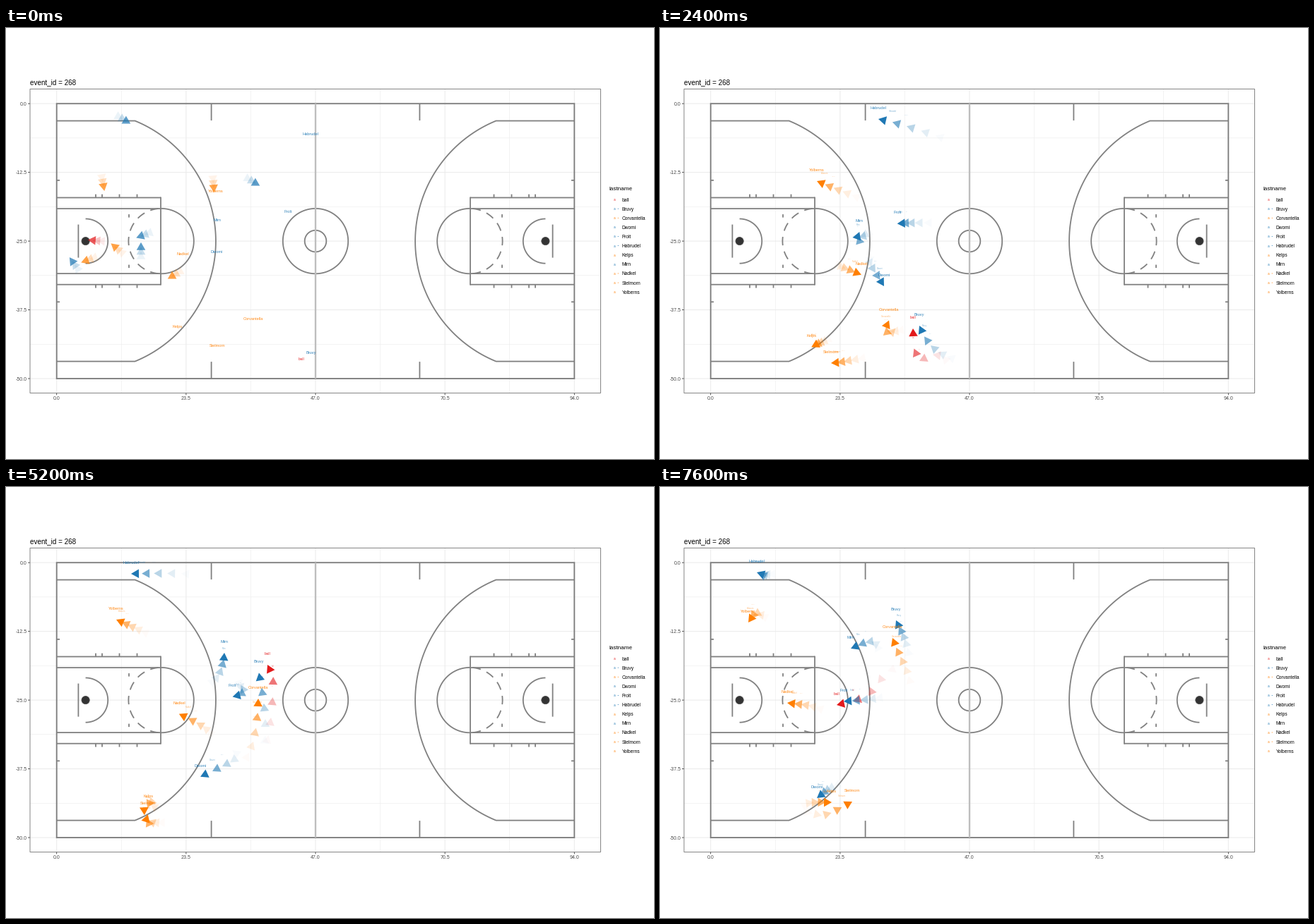
A matplotlib script that plays this animation: 917x611 px, repeating every 8000 ms.

```python
import numpy as np
import matplotlib.pyplot as plt
from matplotlib.animation import FuncAnimation
from matplotlib.patches import Circle, Polygon, Rectangle

W, H, DPI = 917, 611, 100
FRAMES, INTERVAL = 20, 400
PX = 72 / DPI
BLUE, ORANGE, RED = "#1F78B4", "#FF7F00", "#E31A1C"
COURT, GRID = "#808080", "#EBEBEB"
LEFT, RIGHT, TOP, BOTTOM = 71.7, 804.3, 107.2, 497
PANEL = (34, 86.5, 841.5, 517.5)
MID_X, MID_Y = (LEFT + RIGHT) / 2, (TOP + BOTTOM) / 2
TRAIL = 4

plt.rcParams.update({"font.family": "Liberation Sans", "path.snap": False})
fig = plt.figure(figsize=(W / DPI, H / DPI), dpi=DPI, facecolor="white")
ax = fig.add_axes([0, 0, 1, 1])
ax.set_xlim(0, W)
ax.set_ylim(H, 0)
ax.axis("off")


def smooth_path(keys):
    """Cubic Hermite curve through {frame: (x, y)}, sampled once per frame."""
    t = np.array(list(keys), float)
    p = np.array(list(keys.values()), float)
    slope = np.gradient(p, t, axis=0)
    f = np.arange(FRAMES)
    i = np.clip(np.searchsorted(t, f, side="right") - 1, 0, len(t) - 2)
    h = (t[i + 1] - t[i])[:, None]
    u = (f - t[i])[:, None] / h
    return ((1 + 2 * u) * (1 - u) ** 2 * p[i] + u * (1 - u) ** 2 * h * slope[i]
            + u * u * (3 - 2 * u) * p[i + 1] + u * u * (u - 1) * h * slope[i + 1])


class Player:
    def __init__(self, name, color, before, keys):
        self.name, self.color = name, color
        self.before = before  # x, y and heading at the end of the previous play
        self.path = smooth_path(keys)
        step = np.diff(self.path, axis=0, prepend=self.path[:1])
        self.heading = step / np.maximum(np.hypot(*step.T), 1e-6)[:, None]


PLAYERS = [
    Player("ball", RED, (123, 301, 175),
           {0: (418, 485), 3: (386, 463), 4: (367, 472), 6: (358, 426), 10: (375, 327),
            13: (370, 252), 15: (322, 261), 17: (295, 296), 19: (250, 309)}),
    Player("Bruvy", BLUE, (353, 220, -30),
           {0: (432, 476), 4: (383, 450), 6: (367, 422), 10: (367, 329),
            15: (350, 228), 19: (334, 189)}),
    Player("Corvantella", ORANGE, (294, 226, 275),
           {0: (350, 428), 5: (320, 424), 7: (330, 403), 10: (350, 361),
            13: (357, 300), 19: (329, 214)}),
    Player("Dwomi", BLUE, (191, 295, 200),
           {0: (298, 333), 3: (300, 339), 6: (317, 366), 9: (325, 385),
            11: (306, 396), 15: (245, 425), 19: (222, 441)}),
    Player("Frolt", BLUE, (191, 311, 90),
           {0: (399, 276), 5: (341, 277), 8: (331, 280), 10: (334, 290),
            15: (304, 300), 19: (260, 304)}),
    Player("Habrudel", BLUE, (170, 132, -30),
           {0: (431, 166), 6: (309, 129), 13: (177, 123), 15: (152, 124), 19: (137, 121)}),
    Player("Kelps", ORANGE, (113, 330, 200),
           {0: (243, 439), 4: (221, 449), 8: (209, 453), 10: (204, 449),
            12: (200, 455), 15: (211, 448), 19: (243, 447)}),
    Player("Mirn", BLUE, (94, 331, 125),
           {0: (299, 288), 5: (280, 295), 7: (286, 282), 10: (302, 265),
            13: (309, 235), 16: (299, 219), 19: (270, 229)}),
    Player("Nadkel", ORANGE, (154, 310, 140),
           {0: (250, 336), 4: (268, 343), 7: (290, 351), 10: (278, 339),
            15: (220, 312), 19: (180, 306)}),
    Player("Stelmorn", ORANGE, (235, 352, 210),
           {0: (299, 466), 6: (242, 475), 12: (199, 470), 14: (206, 460),
            16: (229, 466), 19: (272, 446)}),
    Player("Yolberns", ORANGE, (138, 224, 280),
           {0: (297, 247), 6: (222, 217), 13: (156, 188), 16: (136, 180), 19: (125, 192)}),
]
MARKED = {"Bruvy", "Corvantella", "Frolt", "Habrudel", "Nadkel", "Stelmorn"}


def line(xs, ys, color=COURT, width=1.8, z=2):
    ax.plot(xs, ys, color=color, lw=width * PX, zorder=z, solid_capstyle="butt")


def frame_box(x0, y0, x1, y1, width, z):
    ax.add_patch(Rectangle((x0, y0), x1 - x0, y1 - y0, fill=False, ec=COURT,
                           lw=width * PX, zorder=z))


def label(x, y, text, size, color="black", **kw):
    return ax.text(x, y, text, fontsize=size * PX, color=color,
                   va="center_baseline", **kw)


def arc_points(cx, r, start, end):
    a = np.radians(np.linspace(start, end, 120))
    return cx + r * np.cos(a), MID_Y + r * np.sin(a)


def draw_half(flip):
    def seg(x0, y0, x1, y1):
        line([flip(x0), flip(x1)], [y0, y1])

    def arc(cx, r, start, end):
        xs, ys = arc_points(cx, r, start, end)
        line(flip(xs), ys)

    hoop, foul = 112.6, 219.6
    xs, ys = arc_points(hoop, 184.3, -67.7, 67.7)
    line(flip(np.r_[LEFT, xs, LEFT]), np.r_[ys[0], ys, ys[-1]])
    arc(hoop, 31.6, -90, 90)
    arc(foul, 46.2, -90, 90)
    for k in range(-3, 4):
        arc(foul, 46.2, 180 + 26 * k - 7.5, 180 + 26 * k + 7.5)

    # Everything else is symmetric about the long axis
    for side in (-1, 1):
        def up(d):
            return MID_Y + side * d

        seg(LEFT, up(46), 219, up(46))
        seg(LEFT, up(61.6), 219, up(61.6))
        for x in (127, 136, 160.5, 185.5):
            seg(x, up(61.6), x, up(66.4))
        seg(174, up(33.5), 174, up(38))
        seg(LEFT, up(86.2), 76, up(86.2))
        seg(290.6, up(171), 290.6, up(194.9))
    seg(219, MID_Y - 62.5, 219, MID_Y + 62.5)
    seg(102.4, MID_Y - 23.5, 102.4, MID_Y + 23.5)
    ax.add_patch(Circle((flip(hoop), MID_Y), 5.6, fc="#333333", ec="#4d4d4d",
                        lw=0.8 * PX, zorder=3))


def draw_axes():
    x0, y0, x1, y1 = PANEL
    for i, f in enumerate(np.linspace(0, 1, 9)):
        x, y = LEFT + f * (RIGHT - LEFT), TOP + f * (BOTTOM - TOP)
        width = 0.55 if i % 2 else 1.05
        line([x, x], [y0, y1], GRID, width, 0)
        line([x0, x1], [y, y], GRID, width, 0)
        if i % 2 == 0:
            line([x, x], [y1, y1 + 2.8], "#333333", 0.9)
            line([x0 - 2.8, x0], [y, y], "#333333", 0.9)
            label(x, 524.6, f"{94 * f:.1f}", 7, "#4d4d4d", ha="center")
            label(29.6, y, f"{0 - 50 * f:.1f}", 7, "#4d4d4d", ha="right")
    frame_box(*PANEL, 0.95, 8)
    label(33.6, 75.8, "event_id = 268", 9.9)


def draw_court():
    frame_box(LEFT, TOP, RIGHT, BOTTOM, 1.9, 2)
    draw_half(lambda x: x)
    draw_half(lambda x: 2 * MID_X - x)
    for r in (46.2, 15.3):
        line(*arc_points(MID_X, r, 0, 360))
    line([MID_X, MID_X], [TOP, BOTTOM], "#BEBEBE", 2.4, 2.5)


def draw_legend():
    label(854, 228, "lastname", 8.2)
    for i, player in enumerate(PLAYERS):
        y = 243 + 13.12 * i
        label(861.2, y, "a", 5, player.color, ha="center", alpha=0.65, weight="bold")
        if player.name in MARKED:
            line([865.6, 867.2], [y, y], player.color, 0.6)
        label(871.8, y, player.name, 6.7)


moving = []


def draw_triangle(tip, heading, color, alpha):
    side = 6.3 * np.array([-heading[1], heading[0]])
    base = tip - 11 * heading
    moving.append(ax.add_patch(Polygon([tip, base + side, base - side], fc=color,
                                       ec="none", alpha=alpha, zorder=5)))


def draw_previous_play(frame):
    for age in range(2, -1, -1):
        for player in PLAYERS:
            x, y, angle = player.before
            a = np.radians(angle)
            heading = np.array([np.cos(a), -np.sin(a)])
            tip = (x, y) + (7.2 - 6.5 * age) * heading
            draw_triangle(tip, heading, player.color, 0.72 * 0.35 ** (frame + age))


def update(frame):
    while moving:
        moving.pop().remove()
    if frame < TRAIL - 1:
        draw_previous_play(frame)
    for age in range(min(frame, TRAIL), -1, -1):
        k = frame - age
        alpha = (1 - age / (TRAIL + 1)) ** 2.3
        for player in PLAYERS:
            if k > 0:
                draw_triangle(player.path[k], player.heading[k], player.color, alpha)
            if age < 3:
                x, y = player.path[k] - (0, 16)
                moving.append(label(x, y, player.name, 5.6 / 2 ** age, player.color,
                                    ha="center", alpha=0.9 * alpha, zorder=6))
    return moving


draw_axes()
draw_court()
draw_legend()
anim = FuncAnimation(fig, update, frames=FRAMES, init_func=lambda: moving,
                     interval=INTERVAL, repeat=True, repeat_delay=0, blit=False)
plt.show()
```
